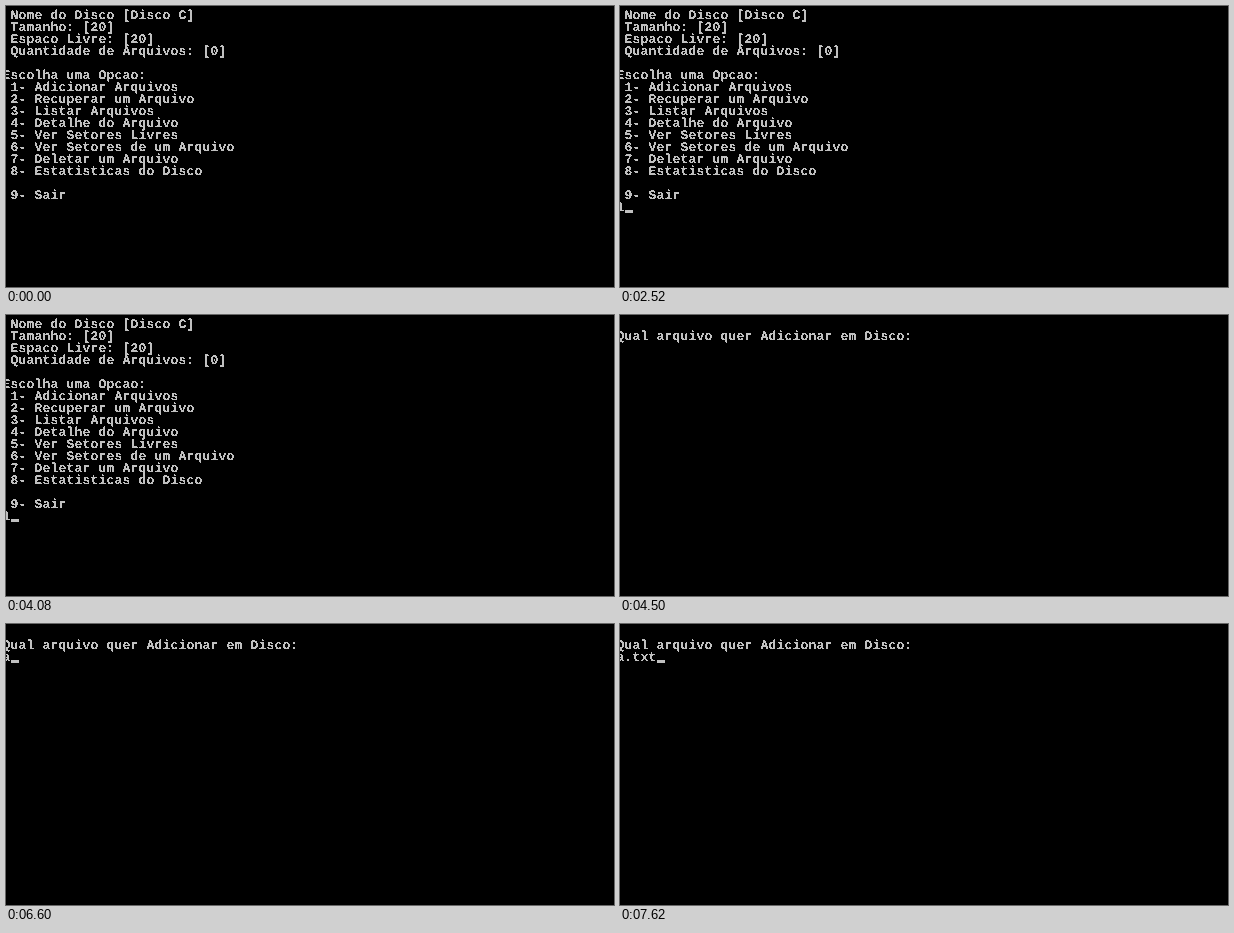
These frames come from a looping animation (608x281 px, 8 s). An HTML page:

```html
<!DOCTYPE html>
<html lang="pt">
<head>
<meta charset="utf-8">
<title>Console</title>
<style>
  html, body { margin: 0; width: 100%; height: 100%; overflow: hidden; background: #000; }
  svg { display: block; width: 100%; height: 100%; }
  text {
    font: bold 13px "Liberation Mono", "DejaVu Sans Mono", monospace;
    letter-spacing: 0.2px;
    fill: #c0c0c0;
    white-space: pre;
    text-rendering: geometricPrecision;
  }
</style>
</head>
<body>
<svg id="stage" viewBox="0 0 608 281">
  <!-- Hard pixel edges, as in a raster console font -->
  <filter id="crisp" filterUnits="userSpaceOnUse" x="0" y="0" width="608" height="281"
          color-interpolation-filters="sRGB">
    <feComponentTransfer><feFuncA type="discrete" tableValues="0 0 1 1 1"/></feComponentTransfer>
  </filter>
  <rect width="608" height="281" fill="#000"/>
  <g id="menu" filter="url(#crisp)"></g>
  <g id="question" filter="url(#crisp)"></g>
  <rect id="cursor" width="8" height="3" fill="#c0c0c0"/>
</svg>
<script>
const LOOP = 8000, CELL_W = 8, CELL_H = 12, LEFT = -3, TOP = 3, BASELINE = 10;
const TEXT_SHIFT = -0.5;
const CLEAR_AT = 4500;

const MENU = [
  " Nome do Disco [Disco C]",
  " Tamanho: [20]",
  " Espaco Livre: [20]",
  " Quantidade de Arquivos: [0]",
  "",
  "Escolha uma Opcao:",
  " 1- Adicionar Arquivos",
  " 2- Recuperar um Arquivo",
  " 3- Listar Arquivos",
  " 4- Detalhe do Arquivo",
  " 5- Ver Setores Livres",
  " 6- Ver Setores de um Arquivo",
  " 7- Deletar um Arquivo",
  " 8- Estatisticas do Disco",
  "",
  " 9- Sair"
];
const QUESTION = ["", "Qual arquivo quer Adicionar em Disco:"];

// [time, text typed so far]
const TYPED = [
  [0, ""], [2340, "1"], [3180, ""], [3840, "1"],
  [CLEAR_AT, ""], [6180, "a"], [6900, "a."],
  [7200, "a.t"], [7320, "a.tx"], [7440, "a.txt"]
];
// [cursor on, cursor off]
const BLINKS = [
  [960, 1500], [2040, 2340], [2520, 3000], [3540, 3840], [4080, 4500],
  [5040, 5580], [6120, 6180], [6600, 6900], [7140, 7200], [7620, 8000]
];

const byId = id => document.getElementById(id);
const menu = byId("menu"), question = byId("question"), cursor = byId("cursor");

function addLine(parent, row, content) {
  const line = document.createElementNS("http://www.w3.org/2000/svg", "text");
  // Leading blanks become a column offset
  const trimmed = content.trimStart();
  const column = content.length - trimmed.length;
  line.setAttribute("x", LEFT + column * CELL_W + TEXT_SHIFT);
  line.setAttribute("y", TOP + row * CELL_H + BASELINE);
  line.textContent = trimmed;
  parent.append(line);
  return line;
}

function addScreen(parent, lines) {
  lines.forEach((content, row) => content && addLine(parent, row, content));
  return addLine(parent, lines.length, "");
}

const menuInput = addScreen(menu, MENU);
const questionInput = addScreen(question, QUESTION);
const show = (node, on) => node.setAttribute("visibility", on ? "visible" : "hidden");

function render(t) {
  const asking = t >= CLEAR_AT;
  const typed = TYPED.filter(([at]) => at <= t).pop()[1];
  const row = (asking ? QUESTION : MENU).length;

  show(menu, !asking);
  show(question, asking);
  (asking ? questionInput : menuInput).textContent = typed;

  cursor.setAttribute("x", LEFT + typed.length * CELL_W);
  cursor.setAttribute("y", TOP + row * CELL_H + 9);
  show(cursor, BLINKS.some(([on, off]) => t >= on && t < off));
}

const start = performance.now();
function tick() {
  render((performance.now() - start) % LOOP);
  requestAnimationFrame(tick);
}
render(0);
requestAnimationFrame(tick);
</script>
</body>
</html>
```
